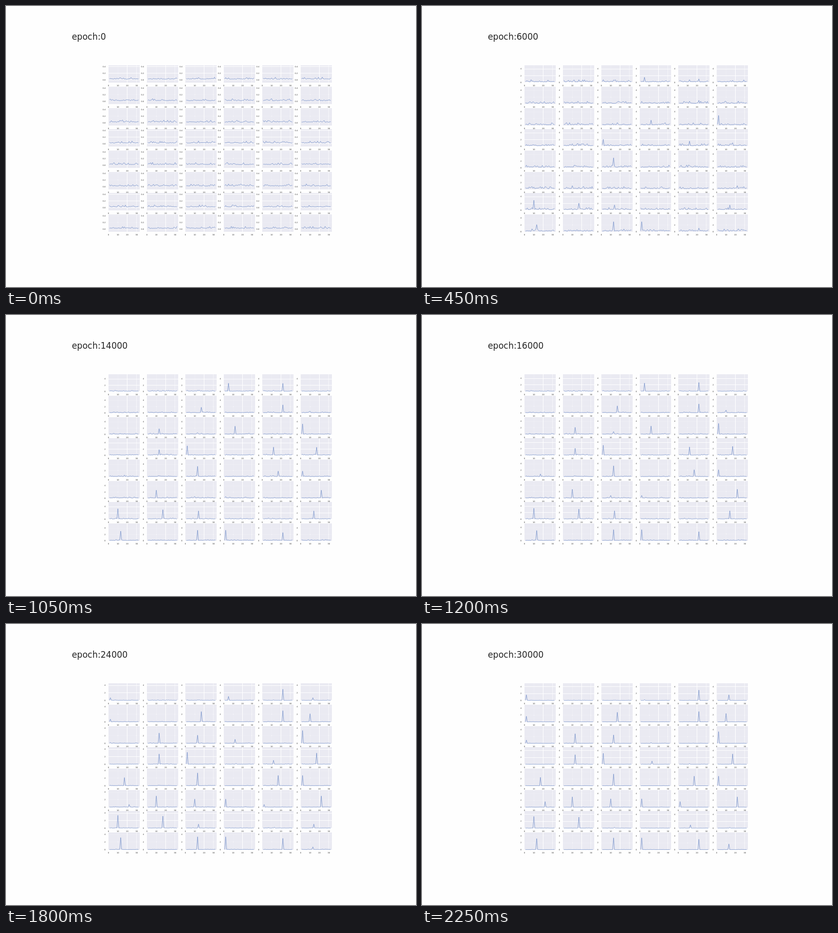
Write an HTML page with a canvas that moves like this. It is 800 by 550 pixels and loops after 2400 ms.

```html
<!DOCTYPE html>
<html>
<head>
<meta charset="utf-8">
<style>
html, body { margin: 0; width: 100%; height: 100%; overflow: hidden; background: #fefefe; }
canvas { display: block; }
</style>
</head>
<body>
<canvas id="stage" width="800" height="550"></canvas>
<script>
const ctx = document.getElementById('stage').getContext('2d');
const FRAME_MS = 150, FRAMES = 16, COLS = 6, ROWS = 8, POINTS = 32;
const PANEL_W = 61, PANEL_H = 34, UNIT_X = 1.83;

// Key points of the upper axis limit: [step, limit]
const limits = [[0, .445], [1, 1.4], [3, 5.1], [5, 6], [10, 4.83], [12, 4.55], [15, 4.97]];

// Peaks that emerge together around one step, as [panel, x]
const waves = [
  { birth: 0, peaks: [[17, 2], [26, 13], [36, 10], [44, 13], [45, 2]] },
  { birth: 2, peaks: [[20, 2], [37, 17], [42, 13]] },
  { birth: 3, death: 11, peaks: [[22, 12], [38, 14], [15, 12], [3, 5], [41, 14]] },
  { birth: 4, peaks: [[31, 10], [23, 17], [46, 22], [10, 22], [35, 22], [4, 22]] },
  { birth: 6, peaks: [[13, 13], [19, 13], [28, 17], [29, 2], [8, 17]] },
  { birth: 9, peaks: [[24, 17], [11, 10], [32, 10], [33, 2], [14, 13]] },
  { birth: 13, peaks: [[0, 2], [6, 2], [5, 13], [47, 13], [30, 22], [34, 2]] },
  { birth: 15, peaks: [[12, 2], [21, 13], [40, 13]] }
];

const ramp = t => 1 / (1 + Math.exp(-t / 1.6));
const warmUp = step => Math.min(1, step / 3);

function axisLimit(step) {
  const k = Math.max(1, limits.findIndex(([s]) => s >= step));
  const [s0, v0] = limits[k - 1], [s1, v1] = limits[k];
  return v0 + (v1 - v0) * (step - s0) / (s1 - s0);
}

function random(seed) {
  const v = Math.sin(seed * 12.9898 + 4.1) * 43758.5453;
  return v - Math.floor(v);
}

function series(panel, step) {
  const decay = Math.exp(-Math.max(0, step - 3) / 5.2);
  const level = Math.max(.04, .4 * decay * warmUp(step));
  const data = Array.from({ length: POINTS + 1 }, (_, x) => {
    const r = random(panel * 40 + x + (step ? 0 : 5000));
    return level * (.4 + .6 * r + 1.1 * r ** 6);
  });
  for (const { birth, death = Infinity, peaks } of waves) {
    const height = (3.4 - .1 * birth) * ramp(step - birth) * ramp(death - step) * warmUp(step);
    for (const [p, x] of peaks) {
      if (p === panel) data[x] = Math.max(data[x], height);
    }
  }
  return data;
}

function label(text, x, y, align) {
  ctx.textAlign = align;
  ctx.fillText(text, x, y);
}

function drawPanel(panel, step) {
  const col = panel % COLS, row = Math.floor(panel / COLS);
  const left = 200 + 75 * col, top = Math.ceil(116 + row * 125 / 3);
  const zero = top + (step ? 33.7 : 28.5);
  const limit = axisLimit(step), scale = (zero - top) / limit;
  const tick = limit < 1 ? .2 : limit < 2 ? .5 : 2;
  const px = x => left + x * UNIT_X, py = y => zero - y * scale;
  const ticksX = [0, 10, 20, 30], ticksY = [];
  for (let v = 0; v <= limit + .03; v += tick) ticksY.push(v);

  ctx.fillStyle = '#eaeaf2';
  ctx.fillRect(left, top, PANEL_W, PANEL_H);

  // Thin grid lines: most are faint, crossings stay as dots
  ctx.fillStyle = '#fff';
  for (const x of ticksX.slice(1)) {
    ctx.globalAlpha = x === 20 ? 1 : x === 30 ? .5 : .15;
    ctx.fillRect(Math.floor(px(x)), top, 1, PANEL_H);
  }
  for (const v of ticksY) {
    const y = Math.floor(py(v));
    ctx.globalAlpha = row % 3 ? .12 : .9;
    ctx.fillRect(left, y, PANEL_W, 1);
    ctx.globalAlpha = 1;
    if (v === tick) for (const x of ticksX.slice(1)) ctx.fillRect(Math.floor(px(x)), y, 1, 1);
  }

  ctx.beginPath();
  series(panel, step).forEach((v, x) => { if (x) ctx.lineTo(px(x), py(v)); });
  ctx.strokeStyle = '#5a7cc0';
  ctx.lineWidth = .65;
  ctx.stroke();

  ctx.fillStyle = '#262626';
  ctx.font = '3.6px "DejaVu Sans", sans-serif';
  ctx.textBaseline = 'middle';
  for (const x of ticksX) label(x, px(x), top + 40.2, 'center');
  for (const v of ticksY) label(tick < 1 ? v.toFixed(1) : v, left - 5.8, py(v) + .2, 'right');
}

function drawTitle(step) {
  ctx.save();
  ctx.translate(128.4, 66);
  ctx.scale(1, 1.1);
  ctx.font = '16.6px "DejaVu Sans", sans-serif';
  ctx.textBaseline = 'alphabetic';
  label('epoch:' + step * 2000, 0, 0, 'left');
  ctx.restore();
}

const start = performance.now();
function draw() {
  const step = Math.floor((performance.now() - start) / FRAME_MS) % FRAMES;
  ctx.fillStyle = '#fefefe';
  ctx.fillRect(0, 0, 800, 550);
  ctx.lineJoin = 'round';
  for (let panel = 0; panel < COLS * ROWS; panel++) drawPanel(panel, step);
  drawTitle(step);
  requestAnimationFrame(draw);
}
draw();
</script>
</body>
</html>
```
